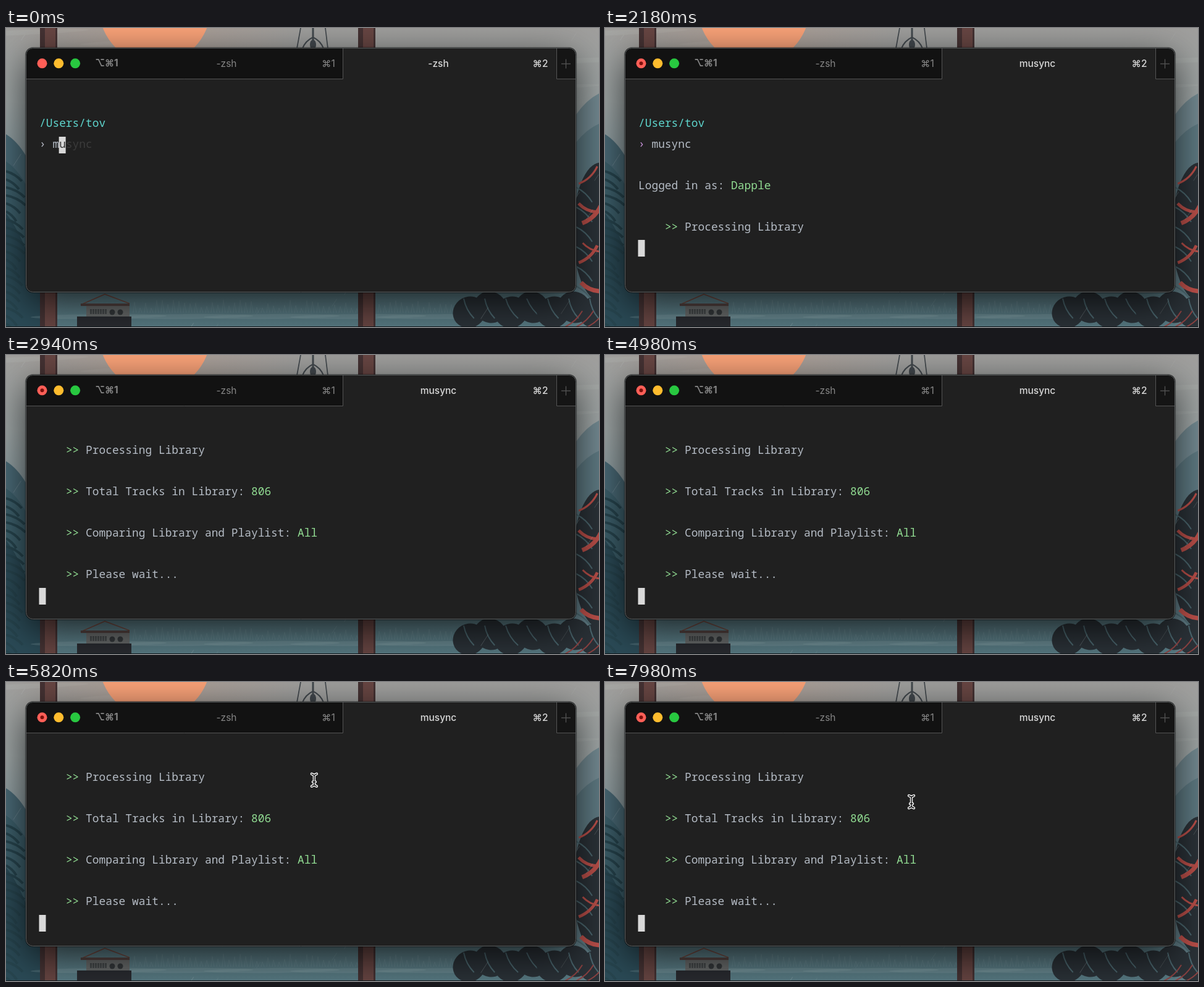
These frames come from a looping animation (960x484 px, 8 s). An HTML page with a canvas:

```html
<!DOCTYPE html>
<html lang="en">
<head>
<meta charset="utf-8">
<title>Terminal</title>
<style>
  html, body { margin: 0; width: 100%; height: 100%; overflow: hidden; background: #202020; }
  canvas { display: block; }
</style>
</head>
<body>
<canvas id="stage" width="960" height="484"></canvas>
<script>
const W = 960, H = 484, LOOP = 8000;
const ctx = document.getElementById('stage').getContext('2d');
const MONO = '500 17.87px "Noto Sans Mono", "DejaVu Sans Mono", monospace';
const UI = '"Inter", "Noto Sans", "DejaVu Sans", sans-serif';
const COL = 10.72, ROW = 33.5, LEFT = 54, BASE = 160;
const C = { text: '#b5bcc5', path: '#5ed5cd', green: '#91dc92', purple: '#c792d9',
            prompt: '#b8bcc8', ghost: '#3b3b3b', cursor: '#d9d9d9', dark: '#202020',
            edge: '#555', dim: '#858585', bright: '#d8d8d8' };
const AT = { second: 100, complete: 500, enter: 1000, start: 1040, login: 1660,
             compare: 2200, wait: 2940, pointer: 5580, rest: 5980 };

const lerp = (a, b, u) => a + (b - a) * u;

function rect(g, color, x, y, w, h) {
  g.fillStyle = color;
  g.fillRect(x, y, w, h);
}

function oval(g, color, x, y, rx, ry = rx, turn = 0) {
  g.beginPath();
  g.ellipse(x, y, rx, ry, turn, 0, Math.PI * 2);
  g.fillStyle = color;
  g.fill();
}

function line(g, color, width, ...p) {
  g.beginPath();
  for (let i = 0; i < p.length; i += 2) g.lineTo(p[i], p[i + 1]);
  g.strokeStyle = color;
  g.lineWidth = width;
  g.stroke();
}

function arc(g, color, width, x, y, dx, dy, bend) {
  g.beginPath();
  g.moveTo(x, y);
  g.quadraticCurveTo(x + dx / 2 - dy * bend, y + dy / 2 + dx * bend, x + dx, y + dy);
  g.strokeStyle = color;
  g.lineWidth = width;
  g.stroke();
}

// Land below a sloping line, down to the bottom of the stage.
function slope(g, color, x0, y0, x1, y1) {
  g.beginPath();
  g.moveTo(x0, y0);
  g.quadraticCurveTo(lerp(x0, x1, .55), lerp(y0, y1, .3), x1, y1);
  g.lineTo(x1, H);
  g.lineTo(x0, H);
  g.fillStyle = color;
  g.fill();
}

function fade(gradient, ...colors) {
  colors.forEach((color, i) => gradient.addColorStop(i / (colors.length - 1), color));
  return gradient;
}

function randomizer(seed) {
  return () => (seed = (seed * 16807) % 2147483647) / 2147483647;
}

function drawSky(g, rnd) {
  const sky = g.createLinearGradient(0, 0, 0, H);
  rect(g, fade(sky, '#a09f9d', '#a0a8a8', '#84989e', '#62828b', '#587b84'), 0, 0, W, H);
  for (let i = 0; i < 9; i++) {
    oval(g, 'rgba(195,196,192,.16)', rnd() * W, 8 + i * 15, 90 + rnd() * 70, 4, -.04);
  }
  const glow = g.createRadialGradient(241, -32, 85, 241, -32, 240);
  rect(g, fade(glow, 'rgba(190,158,140,.3)', 'rgba(190,158,140,0)'), 0, 0, 480, 210);
  oval(g, '#fba379', 241, -32, 90);
}

function drawLand(g, rnd) {
  slope(g, '#4b6b78', 0, 172, 33, 208);
  slope(g, '#3d606c', 0, 216, 33, 255);
  slope(g, '#2b4b57', 0, 300, 56, 428);
  for (let y = 232; y < H; y += 13) {
    arc(g, '#27454f', 4, 0, y, 16 + rnd() * 16, 16, -.15);
  }
  slope(g, '#748b93', 960, 106, 923, 140);
  slope(g, '#5f7b84', 960, 155, 923, 185);

  for (let i = 0; i < 5; i++) {
    oval(g, 'rgba(145,172,177,.25)', 150 + i * 140, 467, 110, 4, -.01);
  }
  for (let x = 206; x < 735; x += 9) {
    line(g, 'rgba(145,172,177,.2)', 1, x, 461, x + 2, 440 + rnd() * 14, x + 5, 461);
  }
}

function drawPost(g, x) {
  rect(g, '#453233', x, 0, 28, H);
  rect(g, '#684643', x + 8, 0, 17, H);
}

function drawLamp(g) {
  const dark = '#42484d';
  for (const side of [-1, 1]) {
    line(g, dark, 1.7, 497 + side * 20, 0, 496 + side * 25, 33);
    arc(g, dark, 2, 497, 15, side * 17, 18, side * -.2);
  }
  line(g, dark, 3, 497, 0, 497, 20);
  oval(g, dark, 497, 27, 5, 8);
}

function drawRadio(g) {
  rect(g, '#292b30', 115, 467, 88, 17);
  line(g, '#744a40', 1.8, 121, 448, 160, 431, 200, 446);
  rect(g, '#554341', 121, 446, 79, 4);
  rect(g, '#686b6b', 130, 450, 70, 17);
  for (let x = 136; x < 164; x += 4) rect(g, '#45494b', x, 455, 3, 8);
  for (const x of [172, 185]) oval(g, '#34383b', x, 460, 4.5);
}

function drawPlant(g, rnd) {
  const dark = '#2b3238', red = '#bd504a', vein = '#4c6870';
  oval(g, dark, 962, 330, 44, 112);
  for (let i = 0; i < 6; i++) {
    const y = 232 + i * 32;
    arc(g, red, 3 + i % 3 * 2, 926 + rnd() * 8, y + 20, 30, i % 2 ? 14 : -28, .2);
    arc(g, vein, 2, 923, y + 26, 26, 24, -.15);
  }
  for (let i = 0; i < 7; i++) {
    const x = 750 + i * 34;
    oval(g, dark, x, 460 - i % 2 * 8, 27, 25, i % 2 - .5);
    arc(g, vein, 2, x - 9, 438, 14 + rnd() * 12, 32, .15);
  }
  for (let i = 0; i < 3; i++) arc(g, '#8d4242', 2, 905 + i * 18, 484, 28, -26, .15);
}

function drawRain(g, rnd) {
  for (let i = 0; i < 70; i++) {
    const x = rnd() * W, y = rnd() * H, len = 6 + rnd() * 18;
    line(g, `rgba(205,218,220,${.08 + rnd() * .2})`, 1, x, y, x - len * .65, y + len);
  }
}

function drawWindow(g) {
  const frame = new Path2D();
  frame.roundRect(32.5, 32.5, 890, 395, 11);
  g.save();
  g.shadowColor = 'rgba(0,0,0,.75)';
  g.shadowBlur = 64;
  g.shadowOffsetY = 18;
  g.fillStyle = C.dark;
  g.fill(frame);
  g.restore();

  g.save();
  g.strokeStyle = 'rgba(0,0,0,.7)';
  g.lineWidth = 2.4;
  g.stroke(frame);
  g.clip(frame);
  rect(g, C.dark, 32, 32, 891, 396);
  rect(g, '#121212', 32, 32, 513, 50);
  rect(g, '#151515', 891, 32, 32, 50);
  line(g, C.edge, 1, 32, 82.5, 545.5, 82.5, 545.5, 32);
  line(g, C.edge, 1, 891.5, 32, 891.5, 82.5, 923, 82.5);
  g.restore();
  g.strokeStyle = '#5c6061';
  g.lineWidth = 1;
  g.stroke(frame);

  line(g, C.edge, 1.3, 899, 58, 914, 58);
  line(g, C.edge, 1.3, 906.5, 50.5, 906.5, 65.5);
  ['#ff5f57', '#febc2e', '#28c840'].forEach((color, i) => oval(g, color, 58.5 + i * 26.8, 57.3, 8));
  label(g, '⌥⌘1', 163, 62, C.dim, 700);
  label(g, '-zsh', 357, 63, C.dim);
  label(g, '⌘1', 522, 63, C.dim);
  label(g, '⌘2', 865, 63, C.bright, 500);
}

function label(g, str, x, y, color, weight = 400) {
  g.font = `${weight} 15.5px ${UI}`;
  g.textAlign = 'center';
  g.fillStyle = color;
  g.fillText(str, x, y);
}

function makeBackdrop() {
  const layer = document.createElement('canvas');
  layer.width = W;
  layer.height = H;
  const g = layer.getContext('2d'), rnd = randomizer(977);
  drawSky(g, rnd);
  drawLand(g, rnd);
  drawPost(g, 55);
  drawPost(g, 570);
  drawLamp(g);
  drawRadio(g);
  drawPlant(g, rnd);
  drawRain(g, rnd);
  rect(g, '#11191d', 0, 483, W, 1);
  drawWindow(g);
  return layer;
}

function write(str, col, row, color) {
  ctx.font = MONO;
  ctx.textAlign = 'left';
  ctx.fillStyle = color;
  ctx.fillText(str, LEFT + col * COL, BASE + row * ROW);
}

function block(col, row) {
  rect(ctx, C.cursor, 53.5 + col * COL, Math.round(142.3 + row * ROW), 11, 27);
}

function step(row, str, value = '') {
  write('>>', 4, row, C.green);
  write(str, 7, row, C.text);
  write(value, 8 + str.length, row, C.green);
}

function drawCommand(t) {
  const word = 'musync';
  const typed = t < AT.second ? 1 : t < AT.complete ? 2 : word.length;
  write('/Users/tov', 0, 0, C.path);
  write('›', 0, 1, t < AT.start ? C.prompt : C.purple);
  write(word.slice(0, typed), 2, 1, C.text);
  write(word.slice(typed), 2 + typed, 1, C.ghost);
  if (t < AT.enter) {
    block(2 + typed, 1);
    write(word.charAt(typed), 2 + typed, 1, '#333');
  }
}

function drawOutput(t) {
  const top = t < AT.compare ? 0 : t < AT.wait ? -3 : -5;
  if (top === 0) drawCommand(t);
  if (t >= AT.login) {
    if (top > -5) {
      write('Logged in as:', 0, top + 3, C.text);
      write('Dapple', 14, top + 3, C.green);
    }
    step(top + 5, 'Processing Library');
  }
  if (t >= AT.compare) {
    step(top + 7, 'Total Tracks in Library:', '806');
    step(top + 9, 'Comparing Library and Playlist:', 'All');
  }
  if (t >= AT.wait) step(top + 11, 'Please wait...');
  if (t >= AT.enter) block(0, t < AT.login ? 2 : t < AT.compare ? 6 : 7);
}

function drawPointer(t) {
  if (t < AT.pointer) return;
  const u = Math.min(1, (t - AT.pointer) / (AT.rest - AT.pointer));
  const ease = u * u * (3 - 2 * u);
  ctx.save();
  ctx.translate(lerp(511, 496, Math.sqrt(ease)), lerp(93, 194, ease));
  ctx.lineCap = ctx.lineJoin = 'round';
  for (const [color, width] of [['#f4f4f4', 4.4], ['#111', 1.5]]) {
    for (const side of [-1, 1]) {
      line(ctx, color, width, -4, side * 10, 0, side * 8, 4, side * 10);
    }
    line(ctx, color, width, 0, -8, 0, 8);
    line(ctx, color, width, -2, 3, 2, 3);
  }
  ctx.restore();
}

const backdrop = makeBackdrop();

function draw() {
  const t = performance.now() % LOOP;
  const running = t >= AT.start;
  ctx.drawImage(backdrop, 0, 0);
  if (running) oval(ctx, '#7d100c', 58.5, 57.3, 3);
  label(ctx, running ? 'musync' : '-zsh', 700, 63, C.bright, 500);
  drawOutput(t);
  drawPointer(t);
  requestAnimationFrame(draw);
}
draw();
</script>
</body>
</html>
```
